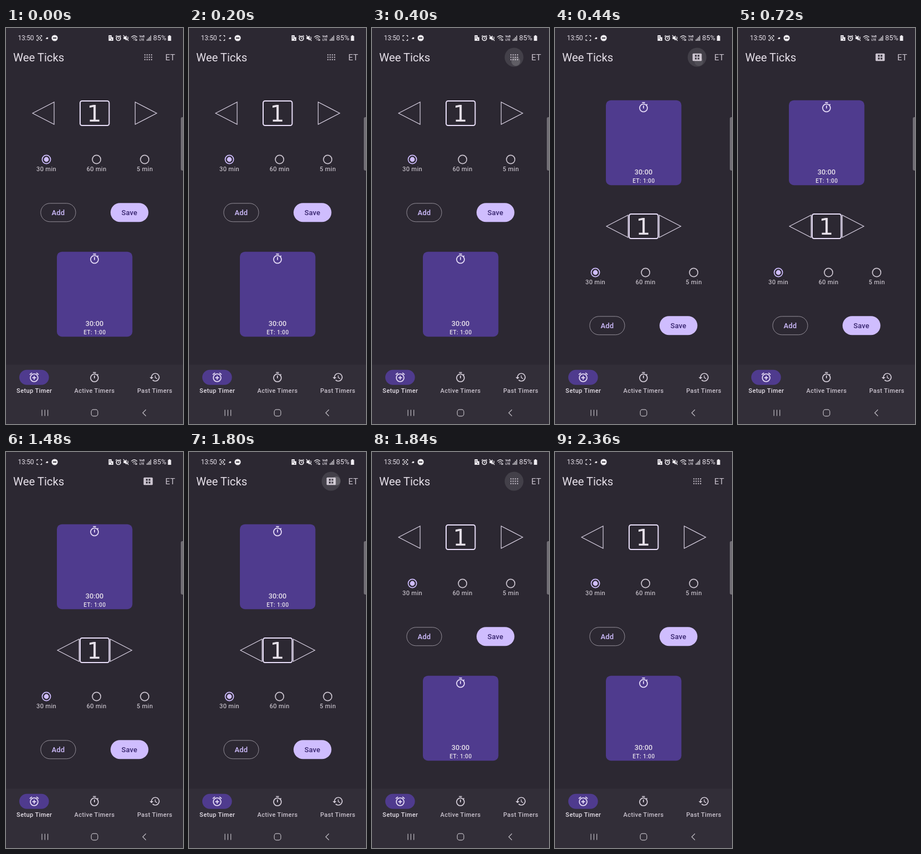
Animation, 320 px wide and 711 px high, one loop 2400 ms. Source, as an HTML page:

```html
<!DOCTYPE html>
<html lang="en">
<head>
<meta charset="utf-8">
<title>Timer setup</title>
<style>
  html, body { margin: 0; height: 100%; overflow: hidden; background: #2c2832; }
  svg { display: block; width: 100vw; height: 100vh; }
  text { font-family: Roboto, sans-serif; fill: #e6e0e9; }
  .mid { text-anchor: middle; }
  .label { font-size: 11px; letter-spacing: .4px; }
  .bold { font-weight: 500; }
  .button { font-size: 13px; letter-spacing: .1px; font-weight: 500; }
  .line { fill: none; stroke: #d8d0e2; stroke-width: 1.2; }
  .radio { fill: none; stroke: #cbc4cf; stroke-width: 1.7; }
  .system { fill: none; stroke: #bdb9c0; stroke-width: 1.2; }
  .status { fill: none; stroke: #eeebf0; stroke-width: 1.2; }
  .solid { fill: #eeebf0; stroke: none; }
  .icon { fill: #d5ceda; }
</style>
</head>
<body>
<svg viewBox="0 0 320 711">
  <defs>
    <path id="stopwatch" d="M15 1H9v2h6V1zm-4 13h2V8h-2v6zm8.03-6.61l1.42-1.42c-.43-.51-.9-.99-1.41-1.41l-1.42 1.42C16.07 4.74 14.12 4 12 4c-4.97 0-9 4.03-9 9s4.02 9 9 9 9-4.03 9-9c0-2.12-.74-4.07-1.97-5.61zM12 20c-3.87 0-7-3.13-7-7s3.13-7 7-7 7 3.13 7 7-3.13 7-7 7z"/>
  </defs>

  <!-- Status bar -->
  <g class="status">
    <text x="21.5" y="22" font-size="12" letter-spacing="-.2" stroke="none">13:50</text>
    <path d="M56 16v-2.5h2.5M62 13.5h2.5V16M64.5 20v2.5H62M58.5 22.5H56V20"/>
    <g id="capture"><rect x="58.3" y="16" width="4" height="4" rx="1"/></g>
    <path class="solid" d="M71.5 19.5l2.5-3 2.5 1-1 2.5z"/>
    <circle class="solid" cx="88" cy="18" r="5.6"/>
    <path d="M85 18h6" stroke="#2c2832" stroke-width="1.8"/>
    <path class="solid" d="M185.5 13h5.5v3.5h3V23h-8.5z"/>
    <path d="M187.2 15.5h2M187.2 18h2M191 19.5v2" stroke="#2c2832"/>
    <circle cx="203.2" cy="18.7" r="3.8" stroke-width="1.7"/>
    <path d="M203.2 16.5v2.4h1.6M198.3 15.3l2.2-2M208 15.3l-2.2-2"/>
    <path class="solid" d="M212.5 16h2.5l3-2.8v9.6l-3-2.8h-2.5z"/>
    <path d="M212 13l9.5 10M219.7 15.5q2 2.5 0 5"/>
    <path d="M226.5 16.5q5.3-5 10.6 0M228.5 18.8q3.4-3 6.6 0M230.4 21h2.8"/>
    <path d="M234.5 20v3m1.8 0v-3"/>
    <g font-size="5.2" font-weight="700" stroke="none">
      <text x="241" y="17">VoB</text><text x="241.3" y="23">LTE</text>
    </g>
    <path d="M255 20.5V23M257.2 18.5V23M259.4 16V23M261.6 13.5V23"/>
    <text x="266" y="22" font-size="12.8" stroke="none">85%</text>
    <path class="solid" d="M294.3 13h2.6v1.2h1.6V23h-5.8v-8.8h1.6z"/>
  </g>

  <!-- App bar -->
  <text x="13" y="59.5" font-size="20.3">Wee Ticks</text>
  <text x="288" y="57.5" font-size="15" fill="#cbc4cf" style="fill:#cbc4cf">ET</text>
  <circle id="ripple" cx="256.8" cy="52.5" r="17" fill="#434049"/>
  <path id="keypad" d="M250.2 48.3h14M250.2 52.5h14M250.2 56.7h14" stroke="#cbc4cf" stroke-width="2" stroke-dasharray="2 2"/>
  <g id="tiles">
    <rect x="248.7" y="45.7" width="16.6" height="13.6" rx="1.6" fill="#cbc4cf"/>
    <path d="M253 48.3h3.2v3.2H253zM257.8 48.3h3.2v3.2h-3.2zM253 53.3h3.2v3.2H253zM257.8 53.3h3.2v3.2h-3.2z" fill="#39353f"/>
  </g>
  <circle id="touch" r="8" fill="#fff"/>

  <!-- Controls -->
  <g id="controls">
    <path id="less" class="line" d="M48 153l39-20v40z"/>
    <path id="more" class="line" d="M272.5 153l-39-20v40z"/>
    <rect class="line" x="134" y="131" width="52.5" height="44" rx="3.5" style="stroke:#e8def8;stroke-width:2"/>
    <text x="146.6" y="168" font-size="41" style="font-family:'DejaVu Sans',sans-serif">1</text>
    <circle class="radio" cx="73" cy="236" r="7.6" style="stroke:#cfbdfe"/>
    <circle cx="73" cy="236" r="4.4" fill="#cfbdfe"/>
    <circle class="radio" cx="163.7" cy="236" r="7.6"/>
    <circle class="radio" cx="250.7" cy="236" r="7.6"/>
    <g class="label mid">
      <text x="73" y="257">30 min</text>
      <text x="163.7" y="257">60 min</text>
      <text x="251" y="257">5 min</text>
    </g>
    <rect x="62.8" y="314.8" width="63.2" height="33" rx="16.5" fill="none" stroke="#948f99"/>
    <text class="button mid" x="94.3" y="335.7" style="fill:#cfbdfe">Add</text>
    <rect x="189" y="314.3" width="68.5" height="34" rx="17" fill="#cfbdfe"/>
    <text class="button mid" x="223" y="335.7" style="fill:#38266f">Save</text>
  </g>

  <g id="card">
    <rect x="92" y="401.7" width="136.5" height="152.5" rx="9" fill="#4f3b8e"/>
    <use href="#stopwatch" transform="translate(149.6 404.2) scale(.87)" fill="#e8def8"/>
    <text class="bold mid" x="160" y="535" font-size="12.8">30:00</text>
    <text class="bold mid" x="160.5" y="550.3" font-size="10" letter-spacing=".45">ET: 1:00</text>
  </g>

  <!-- Navigation -->
  <rect y="604.5" width="320" height="106.5" fill="#322e38"/>
  <rect x="24" y="613.8" width="53.6" height="27" rx="13.5" fill="#4f3b8e"/>
  <path transform="translate(40.6 616.8) scale(.86)" fill="#e8def8" d="M7.88 3.39L6.6 1.86 2 5.71l1.29 1.53 4.59-3.85zM22 5.72l-4.6-3.86-1.29 1.53 4.6 3.86L22 5.72zM12 4c-4.97 0-9 4.03-9 9s4.02 9 9 9c4.97 0 9-4.03 9-9s-4.03-9-9-9zm0 16c-3.87 0-7-3.13-7-7s3.13-7 7-7 7 3.13 7 7-3.13 7-7 7zm1-11h-2v3H8v2h3v3h2v-3h3v-2h-3V9z"/>
  <use href="#stopwatch" class="icon" transform="translate(149.6 617) scale(.86)"/>
  <path class="icon" transform="translate(258.8 616.8) scale(.86)" d="M13 3c-4.97 0-9 4.03-9 9H1l3.89 3.89.07.14L9 12H6c0-3.87 3.13-7 7-7s7 3.13 7 7-3.13 7-7 7c-1.93 0-3.68-.79-4.94-2.06l-1.42 1.42C8.27 19.99 10.51 21 13 21c4.97 0 9-4.03 9-9s-4.03-9-9-9zm-1 5v5l4.28 2.54.72-1.21-3.5-2.08V8H12z"/>
  <g class="label bold mid">
    <text x="51.2" y="655">Setup Timer</text>
    <text x="160" y="655" style="fill:#cbc4cf">Active Timers</text>
    <text x="269" y="655" style="fill:#cbc4cf">Past Timers</text>
  </g>
  <g class="system">
    <path d="M65 685.5v11M70.3 685.5v11M75.6 685.5v11M253 685.3l-5.8 5.7 5.8 5.7"/>
    <rect x="154.2" y="685.2" width="11.8" height="11.6" rx="3.8"/>
  </g>
  <rect x="316" y="160" width="8" height="96" rx="3" fill="#716e75"/>
</svg>

<script>
const LOOP = 2400;
const TAPS = [
  { x: 260, y: 60, start: 280, lift: 400, lifted: 480, fade: 480, end: 640 },
  { x: 266, y: 52, start: 1680, lift: 1800, lifted: 1835, fade: 1900, end: 2060 },
];
const $ = id => document.getElementById(id);
const ramp = (t, from, to) => Math.min(1, Math.max(0, (t - from) / (to - from)));
const show = (id, opacity) => $(id).setAttribute('opacity', +opacity);
const move = (id, x, y) => $(id).setAttribute('transform', `translate(${x} ${y})`);

function draw() {
  const t = performance.now() % LOOP;

  const cardFirst = t >= 440 && t < 1840;
  move('controls', 0, cardFirst ? 203 : 0);
  move('card', 0, cardFirst ? -272 : 0);
  move('less', cardFirst ? 45 : 0, 0);
  move('more', cardFirst ? -45 : 0, 0);
  show('tiles', cardFirst);
  show('keypad', !cardFirst);

  // The capture indicator blinks every half second
  show('capture', Math.floor((t + 320) / 500) % 2 === 0);

  const tap = TAPS[t < 1200 ? 0 : 1];
  const press = ramp(t, tap.start, tap.start + 80);
  show('ripple', press * (1 - ramp(t, tap.fade, tap.end)));
  show('touch', .16 * press * (1 - ramp(t, tap.lift, tap.lifted)));
  move('touch', tap.x, tap.y);

  requestAnimationFrame(draw);
}
draw();
</script>
</body>
</html>
```
